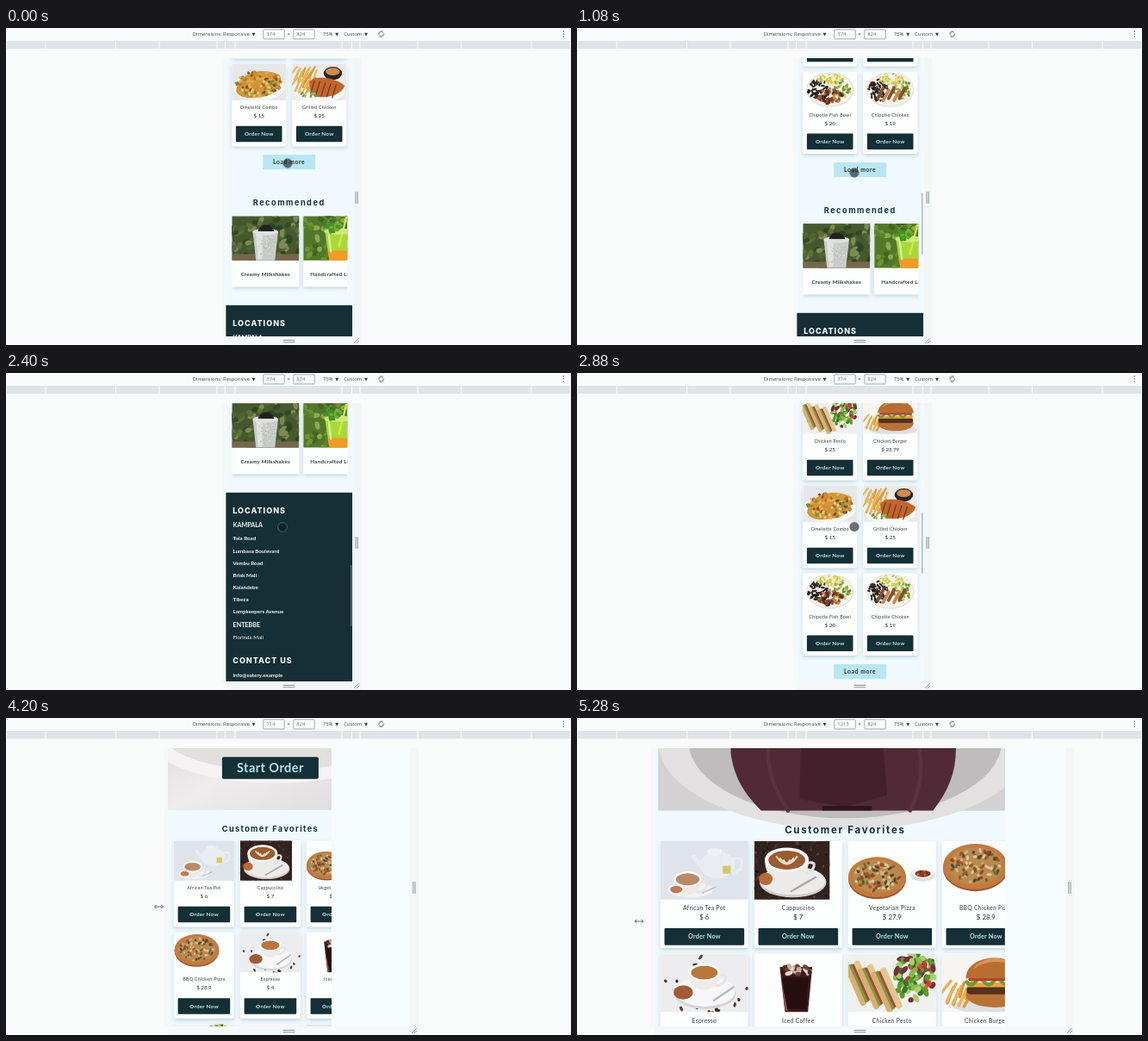
Animation of 656x368 px, one loop 5400 ms. Source, as an HTML page:

```html
<!DOCTYPE html>
<html lang="en">
<head>
<meta charset="utf-8">
<title>Responsive menu</title>
<style>
html, body { margin: 0; width: 100%; height: 100%; overflow: hidden; background: #f8fbfa; }
body > svg { display: block; width: 100vw; height: 100vh; }
.lato { font-family: Lato, sans-serif; }
.head { font-family: Inter, sans-serif; font-weight: 700; }
.tool { font-family: "Open Sans", sans-serif; }
</style>
</head>
<body>
<svg viewBox="0 0 656 368" xmlns="http://www.w3.org/2000/svg">
  <defs id="defs"></defs>
  <g id="scene"></g>
</svg>
<script>
const LOOP = 5400, STEP = 120, TOP = 35, BOTTOM = 358, MID = 328;
const INK = '#142f35', SKY = '#b9e6f1';

// Shape helpers
const rect = (x, y, w, h, fill, more = '') =>
  `<rect x="${x}" y="${y}" width="${w}" height="${h}" fill="${fill}" ${more}/>`;
const oval = (x, y, rx, ry, fill, more = '') =>
  `<ellipse cx="${x}" cy="${y}" rx="${rx}" ry="${ry}" fill="${fill}" ${more}/>`;
const path = (d, fill, more = '') => `<path d="${d}" fill="${fill}" ${more}/>`;
const line = (d, color, width) =>
  path(d, 'none', `stroke="${color}" stroke-width="${width}" stroke-linecap="round"`);
const text = (x, y, size, str, cls, fill, more = '') =>
  `<text x="${x}" y="${y + size * .35}" font-size="${size}" class="${cls}" fill="${fill}" ${more}>${str}</text>`;
const spaced = n => `letter-spacing="${n}"`;
const CENTER = 'text-anchor="middle"', BOLD = 'font-weight="700"';

// Seeded crumbs, leaves and beans inside an ellipse
function bits(seed, n, cx, cy, rx, ry, size, colors) {
  let s = seed, out = '';
  const rnd = () => (s = (s * 16807) % 2147483647) / 2147483647;
  for (let i = 0; i < 5; i++) rnd();
  for (let i = 0; i < n; i++) {
    const a = rnd() * 6.283, r = Math.sqrt(rnd());
    const x = cx + rx * r * Math.cos(a), y = cy + ry * r * Math.sin(a);
    out += oval(x.toFixed(1), y.toFixed(1), (size * (.6 + rnd() * .6)).toFixed(1), (size * .6).toFixed(1),
      colors[i % colors.length], `transform="rotate(${Math.round(rnd() * 180)} ${x.toFixed(1)} ${y.toFixed(1)})"`);
  }
  return out;
}

const pizza = (x, y, rx, ry, seed) =>
  oval(x, y + 2, rx, ry, '#9a552a') + oval(x, y, rx, ry, '#c27a3e') + oval(x, y - 1, rx * .84, ry * .82, '#b98a4e') +
  bits(seed, 80, x, y - 1, rx * .78, ry * .74, 2.6, ['#8b4a2b', '#d3b67c', '#6d6a32', '#a5532f', '#dfc99a', '#4d4a30']);
const cup = (x, y, rx, coffee) =>
  line(`M${x + rx - 2} ${y + 4}q11 -3 7 6q-4 6 -10 5`, '#e6e5e4', 3) +
  path(`M${x - rx} ${y}C${x - rx} ${y + rx * 1.5} ${x + rx} ${y + rx * 1.5} ${x + rx} ${y}Z`, '#ecebea') +
  oval(x, y, rx, rx * .55, '#fdfdfd') + oval(x, y + .5, rx * .84, rx * .43, coffee);
const fries = (x, y, n) => Array.from({ length: n }, (_, i) =>
  line(`M${x + i * 3} ${y + (i * 7) % 11}l${-12 + (i * 5) % 9} ${15 + (i * 3) % 7}`, i % 2 ? '#d99a3c' : '#e6b45a', 3.4)).join('');
const bowl = seed =>
  oval(50, 33, 44, 32, '#e4e2dc') + oval(50, 33, 42, 30, '#f5f3ec') +
  bits(seed, 70, 28, 34, 18, 20, 3, ['#2a211f', '#40302a', '#1d1a1a']) +
  bits(seed + 9, 50, 52, 14, 24, 10, 3, ['#e7cd45', '#b9cc55', '#f1e3a0']) +
  bits(seed + 17, 50, 72, 32, 17, 17, 3.4, ['#8dab3d', '#5d8a30', '#c2cb60']);

const pics = {
  tea: rect(0, 0, 100, 67, '#dfe4ea') + oval(65, 27, 20, 15, '#e9edf1') + oval(62, 12, 9, 4, '#eff2f5') +
    line('M83 20q14 -3 8 12l-8 5', '#e9edf1', 3) + line('M47 29l-9 -11', '#e9edf1', 5) +
    line('M72 10l3 19', '#f4f4f4', .6) + rect(71, 28, 9, 9, '#d7c766') +
    oval(34, 55, 26, 9, '#f0f2f4') + cup(31, 43, 16, '#b98a68') + oval(18, 55, 7, 4, '#bd7c50') +
    line('M48 59l15 -7', '#bbc0c5', 1.5),
  capp: rect(0, 0, 86, 67, '#33231f') +
    bits(31, 120, 43, 34, 55, 42, 2.2, ['#1c1413', '#513730', '#432b26', '#5c4036']) + rect(86, 0, 14, 67, '#fdfefe') +
    oval(44, 47, 38, 17, '#cfcdcb') + oval(44, 45, 37, 16, '#ecebe9') + cup(37, 21, 25, '#9a5c32') +
    [0, 1, 2].map(i => path(`M${25 + i * 4} ${17 + i * 2}q${12 - i * 4} ${18 - i * 5} ${24 - i * 8} 0`, 'none', 'stroke="#f0dcc0" stroke-width="2"')).join('') +
    oval(13, 43, 8, 7, '#b56b39') + line('M42 57L70 41', '#a9a6a4', 2.2),
  veg: pizza(33, 41, 33, 23, 71) + oval(85, 38, 14, 8, '#dfe0e1') + oval(85, 36, 12, 6, '#fff') +
    oval(85, 37, 9, 4, '#8d3e28') + bits(5, 10, 85, 37, 7, 3, 1.3, ['#c4683c', '#5b261c']),
  bbq: pizza(38, 29, 37, 26, 83),
  espresso: rect(0, 0, 100, 67, '#ededef') +
    bits(44, 24, 50, 34, 53, 36, 2.6, ['#3f2b28', '#5a3b32']) +
    oval(51, 45, 35, 18, '#d3d4d8') + oval(51, 43, 34, 17, '#f6f6f7') + cup(50, 21, 18, '#b9753b') +
    oval(26, 44, 11, 8, '#a05a35') + line('M61 53L83 38', '#b9bcc2', 2.6),
  iced: path('M29 15h37l-5 52H35z', '#3a1b16') + path('M32 27h30l-3 36H37z', '#25100f') +
    path('M31 31l7 34h-3z', '#8c5246') + bits(21, 22, 48, 19, 16, 6, 4, ['#6a4337', '#c7aca0', '#4a2a23', '#e4d7d0']),
  pesto: rect(0, 0, 100, 67, '#f0f1ef') + bits(61, 75, 76, 27, 25, 27, 5, ['#5c9a2e', '#86bc48', '#3e7626', '#a8cf6e', '#7a2c3a']) +
    [0, 1, 2].map(i => `<g transform="translate(${i * 15} ${i * 4}) rotate(-24 15 35)">` +
      rect(5, 8, 7, 50, '#d8ae74', 'rx="3"') + rect(11, 9, 4, 47, '#7c9a3f') + rect(14, 10, 3, 45, '#a8493a') +
      rect(17, 8, 7, 50, '#e3c590', 'rx="3"') + '</g>').join('') +
    bits(13, 10, 80, 24, 16, 16, 3, ['#c7392f', '#e2563c']),
  burger: rect(0, 0, 100, 67, '#f7f5f3') + oval(56, 59, 44, 9, '#dfdfdf') + fries(10, 31, 10) +
    oval(60, 47, 33, 14, '#b97337') + rect(28, 37, 64, 9, '#54301f', 'rx="4"') + rect(28, 33, 64, 5, '#e7a637', 'rx="2"') +
    line('M28 32q5 6 10 0t10 0t10 0t10 0t10 0t10 0', '#6f9b36', 4) + rect(30, 27, 60, 4, '#b64030', 'rx="2"') +
    path('M27 28C28 -3 92 -3 93 28z', '#b96d30') + path('M35 18C43 2 72 2 80 12C65 7 47 8 35 18z', '#d9965a'),
  omelette: rect(0, 0, 100, 67, '#e5e7e8') + oval(50, 42, 48, 25, '#f6f6f4') +
    path('M8 50C10 20 50 2 88 20C97 35 80 58 57 60C35 64 15 64 8 50z', '#d0963a') +
    bits(91, 90, 51, 36, 41, 23, 4, ['#e3b14d', '#b46a28', '#ecca78', '#8a4a22', '#d18a33', '#728c3a']),
  grilled: rect(0, 0, 100, 67, '#eceae6') + oval(50, 47, 48, 24, '#fafafa') + fries(9, 5, 13) + fries(10, 25, 12) +
    oval(75, 17, 17, 12, '#272326') + oval(75, 14, 13, 7, '#d18b51') +
    path('M31 33C42 18 82 25 97 40C91 59 55 67 36 56z', '#bf672d') +
    [0, 1, 2, 3, 4].map(i => line(`M${41 + i * 10} ${31 + i * 2}l-7 23`, '#74331c', 2)).join('') +
    bits(16, 14, 32, 55, 16, 7, 3, ['#6d943d', '#9cb956']),
  fish: bowl(23) + bits(37, 36, 50, 44, 24, 14, 4.4, ['#7b4128', '#a76237', '#572b20', '#c38650']),
  chipotle: bowl(53) + [0, 1, 2, 3, 4].map(i => line(`M${37 + i * 10} ${30 + i % 2 * 4}l-10 19`, i % 2 ? '#c78952' : '#86502f', 6)).join(''),
  shake: rect(0, 0, 100, 67, '#46592e') + bits(7, 90, 50, 28, 65, 42, 6, ['#5f7038', '#344927', '#7d8a52', '#4f6532', '#2d4421']) +
    rect(0, 57, 100, 10, '#76674c') + path('M31 23h38l-5 44H36z', '#c9cdca') +
    path('M36 27h10l-1 38h-6z', '#dfe2df') + bits(19, 50, 51, 44, 12, 20, 1.2, ['#b8bdba', '#dfe2e0', '#aeb3b0']) +
    oval(50, 24, 19, 5, '#dfe1df') + path('M39 23C41 10 60 10 63 23z', '#20221f'),
  lemon: rect(0, 0, 100, 67, '#52772a') + bits(17, 75, 50, 30, 60, 40, 6, ['#6d9434', '#406722', '#8aac4a', '#578329']) +
    path('M32 22h40l-5 45H39z', '#a7d83c') + path('M36 52h33l-2 15H39z', '#f09a27') +
    line('M53 46L64 2', '#d6e83c', 3) + oval(51, 23, 20, 5, '#cdea79') +
    bits(29, 20, 45, 16, 12, 9, 4, ['#6fae2b', '#419226']) + line('M38 28l3 25', '#d8f18e', 3),
};
document.getElementById('defs').innerHTML = Object.entries(pics).map(([id, art]) =>
  `<symbol id="${id}" viewBox="0 0 100 66.3" preserveAspectRatio="none">${art}</symbol>`).join('') +
  '<filter id="soft" x="-20%" y="-20%" width="140%" height="150%"><feDropShadow dx="0" dy="2" stdDeviation="2" flood-color="#173a42" flood-opacity=".2"/></filter>' +
  '<linearGradient id="mist" x2="1" y2="1"><stop stop-color="#d7d4d5"/><stop offset=".5" stop-color="#eeecec"/><stop offset="1" stop-color="#dcdada"/></linearGradient>';
const pic = (id, x, y, w, h) => `<use href="#${id}" x="${x}" y="${y}" width="${w}" height="${h}"/>`;

const dishes = [
  ['tea', 'African Tea Pot', '6'], ['capp', 'Cappuccino', '7'],
  ['veg', 'Vegetarian Pizza', '27.9'], ['bbq', 'BBQ Chicken Pizza', '28.9'],
  ['espresso', 'Espresso', '4'], ['iced', 'Iced Coffee', '4'],
  ['pesto', 'Chicken Pesto', '25'], ['burger', 'Chicken Burger', '23.79'],
  ['omelette', 'Omelette Combo', '15'], ['grilled', 'Grilled Chicken', '25'],
  ['fish', 'Chipotle Fish Bowl', '20'], ['chipotle', 'Chipotle Chicken', '19'],
];
const places = ['Tola Road', 'Lumbasa Boulevard', 'Vembu Road', 'Brisk Mall', 'Kolandebe', 'Tibeza', 'Lampkeepers Avenue'];

// Value at time t along [time, value] points
const smooth = p => p * p * (3 - 2 * p);
function along(t, points, ease = p => p) {
  let i = 0;
  while (i < points.length - 1 && points[i + 1][0] <= t) i++;
  const [t0, v0] = points[i], [t1, v1] = points[i + 1] || [t0 + 1, v0];
  return v0 + (v1 - v0) * ease(Math.max(0, (t - t0) / (t1 - t0)));
}
const listY = [[0, -366], [480, -366], [960, -459], [1200, -459], [2160, -651], [2400, -651], [3360, 97], [3600, 142], [5280, 143]];
const device = [[3600, 374], [4200, 714], [4680, 961], [4800, 983], [5280, 1213]];
const layout = [[3600, 147], [4200, 238], [4680, 356], [4800, 364], [5280, 443]];
const painted = [[3600, 147], [4200, 190], [4680, 333], [4800, 342], [5280, 407]];
const cursorX = [[0, 327], [1080, 322], [2400, 321], [3360, 323], [3600, 263], [3720, 246], [4200, 177.5], [4680, 132], [4800, 125], [5280, 72]];
const cursorY = [[0, 157], [1080, 168], [2400, 179], [3360, 178], [3600, 200], [4200, 219], [4680, 223.5], [5280, 236]];

// Banner drawn upwards from its lower edge, in hundredths of its width
function hero(t, W, bottom) {
  if (bottom < 0) return '';
  let art = rect(0, -60, 100, 60, 'url(#mist)');
  if (t < 4440) {
    art += oval(52, -36, 62, 23, '#f4f2f2') + oval(52, -39, 56, 20, '#e2dfdf');
  } else if (t < 5040) {
    art += rect(0, -60, 100, 60, '#ece9ea') + oval(52, -23, 39, 15, '#d9d6d7') + oval(52, -24, 38, 15, '#faf9f9') +
      oval(52, -26, 31, 11, '#e6e3e4') +
      [[3.6, -10.2], [2, -18.6], [90, -10.4]].map(([x, y]) =>
        oval(x, y, 3.6, 2.5, '#4a2a24') + line(`M${x - 2.5} ${y}q2.5 -1.5 5 0`, '#241413', .5)).join('');
  } else {
    art += rect(0, -60, 100, 60, '#d3d1d2') + oval(49, -18, 49, 23, '#e2e0e1') + oval(49, -18, 41, 20, '#bfbcbe') +
      path('M19 -40V-15C20 -8 23 -4 27 0H72C76 -5 78 -10 78 -16V-40z', '#512a38') +
      path('M38 -40L37 -3L49 -1L60 -4L57 -40z', '#43202c') +
      line('M29 -18C28 -10 31 -5 34 0M68 -18C70 -10 68 -4 66 0', '#5c3241', 1) + rect(43, -1.2, 13, 1.2, '#2f141b');
  }
  const x = along(t, [[4800, 0], [5280, 4.5]]);
  let out = `<g transform="translate(${x} ${bottom}) scale(${W / 100})">${art}</g>`;
  if (t < 4440) out += rect(W / 2 - 56, bottom - 61.5, 112, 25.5, INK, 'rx="2"') +
    text(W / 2, bottom - 48.5, 14.6, 'Start Order', 'lato', SKY, `${CENTER} ${BOLD} ${spaced(.4)}`);
  return out;
}

function card([id, name, price], x, y, w, h, cardH, k, big) {
  const c = x + w / 2, b = y + h, grow = k - 1;
  const top = b + 30 + grow * 13, btnH = 18.5 + grow * 5;
  return rect(x, y, w, h + cardH, '#fdfefe', 'rx="2" filter="url(#soft)"') + pic(id, x, y, w, h) +
    text(c, b + 8.3 + grow * 7, 5.3 * k, name, 'lato', '#333b3d', `${CENTER} ${spaced(.28 * k)}`) +
    text(c, b + 18 + grow * 10, 6.2 * k, '$ ' + price, 'lato', '#20292b', CENTER) +
    rect(x + 4.7, top, w - 9.4, btnH, INK, 'rx="1"') +
    text(c, top + btnH / 2, 6.4 * big, 'Order Now', 'lato', SKY, `${CENTER} ${BOLD} ${spaced(.2)}`);
}

function recommended(W, y) {
  const item = (x, id, name) => rect(x, 0, 78, 82, '#fdfefe', 'filter="url(#soft)"') + pic(id, x, 0, 78, 51.5) +
    text(x + 39, 67.5, 6.2, name, 'lato', '#333b3d', `${CENTER} ${BOLD} ${spaced(.25)}`);
  return text(W / 2, y - 15, 9.2, 'Recommended', 'head', INK, `${CENTER} ${spaced(1.5)}`) +
    `<svg x="7" y="${y}" width="${W - 13}" height="90">${item(0, 'shake', 'Creamy Milkshakes')}${item(83, 'lemon', 'Handcrafted Lemons')}</svg>`;
}

function footer(W, y) {
  const row = (dy, size, str, more = BOLD) => text(8.3, y + dy, size, str, 'lato', '#eef6f7', more);
  const title = (dy, str) => text(8, y + dy, 9, str, 'head', '#f4fafa', `style="font-weight:800" ${spaced(1)}`);
  return rect(0, y, W, 330, INK) + title(21.3, 'LOCATIONS') + row(38, 7.2, 'KAMPALA') +
    places.map((p, i) => row(53.5 + i * 14.1, 6.2, p)).join('') +
    row(154, 7.2, 'ENTEBBE') + row(168.3, 6.2, 'Florinda Mall', '') +
    title(195.3, 'CONTACT US') + row(211.7, 6.2, 'info@eatery.example');
}

function page(t, L) {
  const W = along(t, layout), y0 = along(t, listY, smooth) - TOP;
  const cols = W < 200 ? 2 : W < 300 ? 3 : 4;
  const pitch = (W - 7) / cols, w = pitch - 7, h = w * .663;
  const k = Math.max(1, 1 + (W - 238) * .00128), big = W > 400 ? 1.13 : 1;
  const cardH = 53.5 + (k - 1) * 11, step = h + cardH + 6.7;
  const shown = dishes.slice(0, t < 240 ? 10 : 12);
  const titleK = W > 300 ? 1.25 : 1;
  let out = rect(0, 0, W, 400, '#f0fafe') + hero(t, W, y0 - 35.5) +
    text(W / 2, y0 - 13.3, 9.2 * titleK, 'Customer Favorites', 'head', INK, `${CENTER} ${spaced(1.35 * titleK)}`);
  shown.forEach((dish, i) => {
    const y = y0 + Math.floor(i / cols) * step;
    if (y > -step - 10 && y < 330) out += card(dish, 7 + i % cols * pitch, y, w, h, cardH, k, big);
  });
  const end = y0 + Math.ceil(shown.length / cols) * step - 6.7;
  if (end < 330) out += rect(W / 2 - 30.5, end + 10, 61, 17, SKY) +
    text(W / 2, end + 18.3, 6.8, 'Load more', 'lato', '#27383c', `${CENTER} ${BOLD} ${spaced(.6)}`) +
    recommended(W, end + 81) + footer(W, end + 184.7);
  if (t >= 960 && t <= 3600)
    out += rect(145, 66 + (62 - y0) * .163, 1.2, 71, '#83979b', 'rx=".6" opacity=".8"');
  return `<svg x="${L}" y="${TOP}" width="${along(t, painted)}" height="${BOTTOM - TOP}">${out}</svg>`;
}

function toolbar(width) {
  const label = (x, s, c = '#3f4647') => text(x, 7.4, 5.85, s, 'tool', c);
  const arrow = x => path(`M${x - 2} 5.8h4l-2 3.8z`, '#33393a');
  const box = (x, s) => rect(x, 1.8, 24.4, 11, '#fcfdfd', 'rx="1" stroke="#8d979b" stroke-width=".8"') + label(x + 3.5, s, '#686f71');
  const ticks = [62, 73.5, 83, 150, 200.5, 282].map(d => rect(MID - d - .5, 15, 1, 9, '#f8fbfa') + rect(MID + d - .5, 15, 1, 9, '#f8fbfa')).join('');
  return label(216.8, 'Dimensions: Responsive') + arrow(287.5) + box(298.8, width) + label(326.6, '×') + box(333.8, 824) +
    label(367.8, '75%') + arrow(384.2) + label(392.2, 'Custom') + arrow(418) +
    `<g transform="rotate(45 435.6 7)">${rect(433.6, 4.8, 4, 4.4, 'none', 'stroke="#626a6c" stroke-width=".7"')}</g>` +
    line('M432.6 6a3.4 3.4 0 0 1 5 -2M438.6 8a3.4 3.4 0 0 1 -5 2', '#626a6c', .7) +
    [4, 7, 10].map(y => oval(647.3, y, .7, .7, '#555d5f')).join('') +
    rect(1, 15, 654, 9, '#dfe4e8') + ticks;
}

function frame(L, R) {
  return rect(L - 4, TOP, 4, BOTTOM - TOP, '#f5f8f8') + rect(L, TOP, R - L, BOTTOM - TOP, '#f6fcfd') +
    rect(R, TOP, 10, 333, '#f3f6f6') + rect(L, BOTTOM, R - L, 10, '#f5f8f8') +
    line(`M${R + 3.8} 190.5v13M${R + 6} 190.5v13`, '#7f888a', .9) +
    line('M322 362.5h13M322 364.8h13', '#7f888a', .9) +
    line(`M${R + 2.5} 365.5l5 -5M${R + 5} 365.8l2.7 -2.7`, '#7b8486', .9);
}

function cursor(t) {
  const x = along(t, cursorX), y = along(t, cursorY);
  if (t <= 3600) return oval(x, y, 5.4, 5.4, '#141c20', 'fill-opacity=".62" stroke="#7d8789" stroke-opacity=".55"');
  return line(`M${x - 4.5} ${y}h9M${x - 2.8} ${y - 1.8}l-2.3 1.8l2.3 1.8M${x + 2.8} ${y - 1.8}l2.3 1.8l-2.3 1.8`, '#5b6264', .9);
}

const scene = document.getElementById('scene');
function draw(t) {
  const width = Math.round(along(t, device)), half = width * .393 / 2;
  const L = MID + .7 - half - (width > 374 ? .5 : 0), R = MID + .7 + half;
  scene.innerHTML = rect(0, 0, 656, 368, '#f8fbfa') + toolbar(width) + frame(L, R) + page(t, L) + cursor(t);
}

// The picture advances in steps of 120 ms
let last = -1;
function tick() {
  const t = Math.floor(performance.now() % LOOP / STEP) * STEP;
  if (t !== last) draw(last = t);
  requestAnimationFrame(tick);
}
tick();
</script>
</body>
</html>
```
